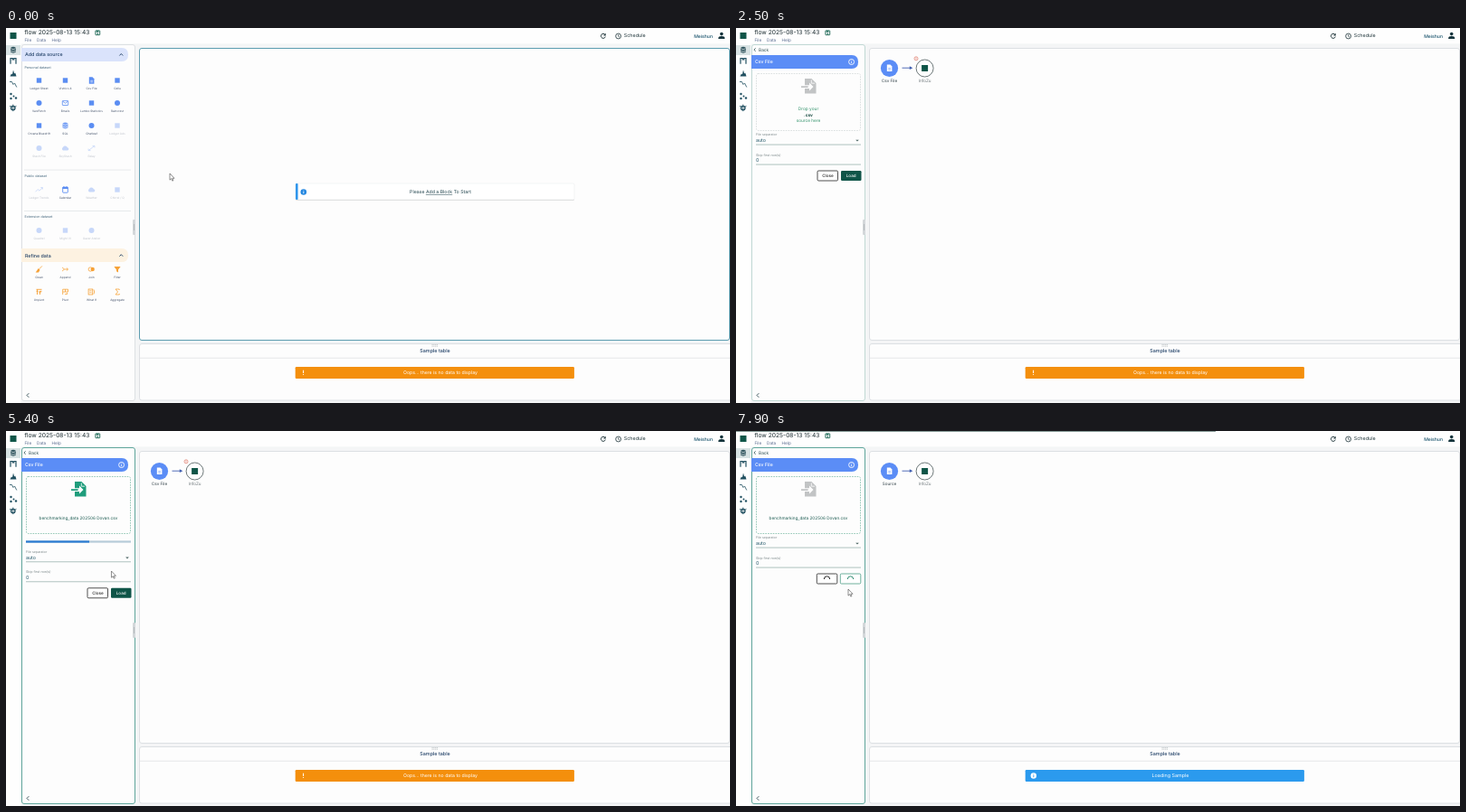
Write an HTML page that moves like this. It is 800 px wide and 415 px high and loops after 8 s.

```html
<!DOCTYPE html>
<html lang="en">
<head>
<meta charset="utf-8">
<title>Flow editor</title>
<style>
  html, body { margin: 0; width: 100%; height: 100%; overflow: hidden; background: #fff; }
  svg { display: block; width: 800px; height: 415px; }
  text { font-family: Inter, "Open Sans", sans-serif; text-rendering: geometricPrecision; }
  .drag text { font-family: "Open Sans", "Noto Sans", sans-serif; }
  .link { text-decoration: underline; text-decoration-thickness: .5px; text-underline-offset: .7px; }
</style>
</head>
<body>
<svg id="stage" viewBox="0 0 800 415" xmlns="http://www.w3.org/2000/svg"></svg>
<script>
const LOOP = 8000, STEP = 100;
const CLICK = 1400, LEAVE = 2300, DRAG = 2900, DROP = 4200, LOAD = 6700;
const TEAL = '#0f5548', NAVY = '#1f3f66', BLUE = '#5b8df2', ORANGE = '#f6a238';

// Drawing helpers
const text = (x, y, s, size, fill, more = '') =>
  `<text x="${x}" y="${y}" font-size="${size}" fill="${fill}" ${more}>${s}</text>`;
const mid = (x, y, s, size, fill, more = '') =>
  text(x, y, s, size, fill, 'text-anchor="middle" ' + more);
const rect = (x, y, w, h, fill, more = '') =>
  `<rect x="${x}" y="${y}" width="${w}" height="${h}" fill="${fill}" ${more}/>`;
const disc = (x, y, r, fill, more = '') =>
  `<circle cx="${x}" cy="${y}" r="${r}" fill="${fill}" ${more}/>`;
const line = (d, color, w = .8, more = '') =>
  `<path d="${d}" fill="none" stroke="${color}" stroke-width="${w}" ${more}/>`;
const shape = (d, fill, more = '') => `<path d="${d}" fill="${fill}" ${more}/>`;
const at = (x, y, body, more = '') => `<g transform="translate(${x} ${y})" ${more}>${body}</g>`;
const group = (id, body, more = '') => `<g id="${id}" ${more}>${body}</g>`;
const MEDIUM = 'font-weight="500"';

// Small icons, centred on 0,0 and taking one colour
const icons = {
  box: c => rect(-2.7, -2.7, 5.4, 5.4, c),
  dot: c => disc(0, 0, 3, c),
  doc: c => shape('M-2.7 -3.7H1L2.9 -1.8V3.7H-2.7Z', c) + line('M-1.3 .3H1.5M-1.3 1.9H1.5', '#fff', .6),
  mail: c => rect(-3.2, -2.4, 6.4, 4.9, 'none', `stroke="${c}" stroke-width=".8" rx=".5"`) + line('M-3 -2L0 .3L3 -2', c),
  base: c => shape('M-3 -2.3Q0 -4.6 3 -2.3V2.3Q0 4.5 -3 2.3Z', c, 'opacity=".85"') + line('M-3 -1.5Q0 .2 3 -1.5M-3 1Q0 2.7 3 1', '#fff', .6),
  cloud: c => shape('M-2.5 2.5A2 2 0 0 1 -2.5 -1A2.7 2.7 0 0 1 2.4 -.8A1.7 1.7 0 0 1 2.6 2.5Z', c),
  trend: c => line('M-4 2.3L-1.4 -.5L.5 1.2L3.8 -2.3M1.8 -2.5H3.9V-.5', c),
  arrows: c => line('M-3.3 2.5L3.3 -2.5M1 -2.6H3.4V-.6M-3.4 .6V2.6H-1', c),
  calendar: c => rect(-2.8, -2.8, 5.6, 6, 'none', `stroke="${c}" stroke-width=".9" rx=".5"`) + rect(-3, -3, 6, 2, c) + line('M-1.6 -4V-2.5M1.6 -4V-2.5', c),
  broom: c => line('M3.4 -3.6L.2 -.2', c) + shape('M-.7 -1L1 .8L-.5 3.4H-3.8Z', c),
  append: c => line('M-3.4 -2L-1 0H3M-3.4 2L-1 0M1.4 -1.5L3 0L1.4 1.5', c),
  join: c => disc(-1.2, 0, 2.2, 'none', `stroke="${c}" stroke-width=".8"`) + disc(1.2, 0, 2.2, c),
  filter: c => shape('M-3.6 -3H3.6L1 .4V3.4L-1 2.2V.4Z', c),
  unpivot: c => line('M-3 -2.7H3M-3 -.7H-.8M-2 -2.7V3M1 3V-.7H3M-.2 .6L1 -.8L2.2 .6', c, .9),
  pivot: c => line('M-2.8 3V-2.8H3V0H-2.8M0 -2.8V0M-.4 2.6H2V.8', c),
  whatIf: c => rect(-3.4, -3, 4.6, 6, 'none', `stroke="${c}" stroke-width=".8"`) + line('M-2.2 -1.2H0M-2.2 .8H0M2.4 -2.6Q4 0 2.4 2.6', c),
  sigma: c => line('M2.2 -2V-3H-2L.6 0L-2 3H2.3V2', c)
};

const COLS = [36.5, 65.5, 94.5, 123];
// [icon, label, disabled]
const row = (y, color, items) => items.map(([icon, label, off], i) =>
  at(COLS[i], y, icons[icon](color) + mid(0, 10.1, label, 3.2, '#46546c'), off ? 'opacity=".33"' : '')).join('');
const chevronUp = y => line(`M125.4 ${y + 1}L127.3 ${y - 1}L129.2 ${y + 1}`, NAVY, .9);
const pill = (y, fill) => shape(`M17 ${y}H128Q135 ${y} 135 ${y + 7.5}T128 ${y + 15}H17Z`, fill);
const heading = (y, s) => text(20.5, y, s, 3.7, '#47697f');
const rule = y => rect(20, y, 118, .7, '#dfe2e4');

const listView = pill(22, '#dae3fb') + text(21, 31.4, 'Add data source', 5.3, NAVY, MEDIUM) + chevronUp(29.5)
  + heading(44.8, 'Personal dataset')
  + row(58, BLUE, [['box', 'Ledger Sheet'], ['box', 'Vistrics 4'], ['doc', 'Csv File'], ['box', 'Cellu']])
  + rect(88, 52, 12.5, 12.5, '#dde7f6', 'id="iconHover" opacity=".7"')
  + row(83, BLUE, [['dot', 'VastFetch'], ['mail', 'Emails'], ['box', 'Lumbo Statistics'], ['dot', 'Raincrest']])
  + row(108, BLUE, [['box', 'Orvana Bluedrift'], ['base', 'SQL'], ['dot', 'Chatleaf'], ['box', 'Ledger Ads', 1]])
  + row(133, BLUE, [['dot', 'Stash File', 1], ['cloud', 'SkyStash', 1], ['arrows', 'Relay', 1]])
  + rule(156.7) + heading(165, 'Public dataset')
  + row(179, BLUE, [['trend', 'Ledger Trends', 1], ['calendar', 'Calendar'], ['cloud', 'Weather', 1], ['box', 'Chirrel / Q', 1]])
  + rule(202) + heading(210.4, 'Extension dataset')
  + row(224, BLUE, [['dot', 'Quadrel', 1], ['box', 'Might VI', 1], ['dot', 'Gazer Atelier', 1]])
  + pill(244, '#fdf2e1') + text(21, 253.5, 'Refine data', 5.3, NAVY, MEDIUM) + chevronUp(251.7)
  + row(267, ORANGE, [['broom', 'Clean'], ['append', 'Append'], ['join', 'Join'], ['filter', 'Filter']])
  + row(292, ORANGE, [['unpivot', 'Unpivot'], ['pivot', 'Pivot'], ['whatIf', 'What If'], ['sigma', 'Aggregate']]);

const info = (x, y, r, fill, ink) => disc(x, y, r, fill) + line(`M${x} ${y - .4}V${y + 1.7}M${x} ${y - 1.8}V${y - 1}`, ink, .9);
const button = (id, x, fill, stroke) => rect(x, 158, 22.5, 11, fill, `id="${id}" rx="1.2" stroke="${stroke}" stroke-width=".8"`);
const spinner = (x, color) => at(x, 164, line('M-3.2 0A3.2 3.2 0 0 1 3.2 0', color, 1, 'class="spin"'));

const fields = text(22, 119.3, 'File separator', 3.6, '#7e8a8c')
  + text(22, 126.4, 'auto', 5.3, '#24586a') + shape('M132.2 123.7H135.8L134 125.6Z', '#4c6664')
  + rect(22, 128.7, 116, .7, '#8ba8a4')
  + text(22, 141.5, 'Skip first row(s)', 3.7, '#7e8a8c') + text(22, 148.4, '0', 5.3, '#24586a')
  + rect(22, 150.7, 116, .7, '#8ba8a4')
  + group('buttons', button('close', 90, '#fff', '#222') + mid(101.4, 165.2, 'Close', 4.6, '#222', MEDIUM)
    + button('load', 116, TEAL, 'none') + mid(127.2, 165.2, 'Load', 4.6, '#fff', MEDIUM))
  + group('waiting', button('w1', 89.3, '#fff', '#222') + button('w2', 115.3, '#fff', '#4a9c85')
    + spinner(100.5, '#222') + spinner(126.5, '#2d8a70'));

const csvView = line('M21.6 22.3L20 24.1L21.6 25.9', '#2f5053', .8) + text(25, 26, 'Back', 4.8, '#2f5053')
  + pill(30, '#5b8df6') + text(21, 39.4, 'Csv File', 5.2, '#fff', MEDIUM)
  + disc(127.6, 37.5, 3, 'none', 'stroke="#fff" stroke-width=".9"') + line('M127.6 37.1V39.2M127.6 35.7V36.4', '#fff')
  + rect(22.5, 50.5, 115, 63, 'none', 'id="zone" rx="2" stroke-width=".6" stroke-dasharray="1.6 1.2"')
  + group('zoneIcon', shape('M76 56H83.5L88.5 61V72.5H76V67H81V69.5L85.5 65L81 60.5V63.2H76Z M72 64.2H79.6V66H72Z', 'currentColor')
    + shape('M83.3 57.5V61.2H87', 'none', 'stroke="#fff" stroke-width=".8"'))
  + group('prompt', mid(80, 91, 'Drop your', 4.8, '#2e9068') + mid(80, 97.6, '.csv', 4.7, '#14483e', 'font-weight="700"')
    + mid(80, 104.2, 'source here', 4.7, '#2e9068'))
  + mid(80, 97.7, 'benchmarking_data 202506 Dovan.csv', 4.7, '#1d5c52', 'id="fileName"')
  + group('upload', rect(22, 121.4, 116, 2.2, '#b6cbd9') + rect(22, 121.4, 70, 2.2, '#2c7cd3'))
  + group('fields', fields);

const rail = rect(0, 19, 16, 11, '#d8e2e3')
  + at(8, 24.3, icons.base('#173f4a'))
  + line('M5 39.8V33.5H7.3V35H8.8V33.5H11V39.8', '#1f4e5f', 1.2)
  + shape('M4.5 53.5L6 50.5L7 51.5L8 46.5L9.2 50.5L10.2 49.5L11.5 53.5Z', '#1f4e5f')
  + line('M4 59.5H6.5L8 62.5L9.5 61L11.8 65.5', '#1f4e5f', .8)
  + disc(5.5, 73, 1.2, '#1f4e5f') + disc(5.5, 78, 1.2, '#1f4e5f') + disc(8.5, 75.5, 1, '#1f4e5f') + disc(11, 77.5, 1.2, '#1f4e5f')
  + disc(7.8, 88.5, 2.2, 'none', 'stroke="#1f4e5f" stroke-width="1.3"') + line('M7.8 84.5V92.2M4 86.3L6 87.3M11.5 86.3L9.6 87.3', '#1f4e5f');

const header = rect(4.5, 5, 7, 7, TEAL)
  + text(20.4, 7, 'flow 2025-08-13 15:43', 6.7, '#1b2b30')
  + text(20.4, 15.2, 'File', 4.7, '#5a6c90') + text(34, 15.2, 'Data', 4.7, '#5a6c90') + text(50.6, 15.2, 'Help', 4.7, '#5a6c90')
  + rect(98.9, 2.9, 4.8, 4.8, 'none', 'stroke="#12614f" stroke-width=".9" rx=".4"') + rect(99.8, 3.2, 2.6, 1.4, '#12614f') + disc(101.3, 6.2, .8, '#12614f')
  + line('M661.8 7.2A2.5 2.5 0 1 0 662.3 9.6', '#1d3338', 1) + shape('M662.7 5.7V8.5H660Z', '#1d3338')
  + disc(676.6, 9, 2.9, 'none', 'stroke="#1d3338" stroke-width=".8"') + line('M676.6 7.2V9.2L677.9 10', '#1d3338', .7)
  + text(682.8, 10.4, 'Schedule', 5.4, '#1d3338')
  + text(781, 10.8, 'Meishun', 5.1, '#15506a', 'text-anchor="end" ' + MEDIUM)
  + disc(790.7, 6.6, 1.8, '#14343c') + shape('M787.2 12V11Q787.2 9 790.7 9T794.2 11V12Z', '#14343c');

const frame = (id, x, y, w, h) => rect(x, y, w, h, '#fdfdfd', `id="${id}" rx="2.5"`);
const banner = (id, fill, body) => group(id, rect(319.7, 375.1, 308.2, 12.9, fill, 'rx="1.2"') + body);

const startCard = rect(320, 173, 308, 18, '#000', 'opacity=".13" rx="1.5"')
  + rect(320, 172, 308, 18, '#fff', 'rx="1.5" stroke="#e6e8ea" stroke-width=".5"')
  + rect(320, 172, 2.6, 18, '#2f96ec', 'rx="1"') + info(328.8, 181.5, 3.3, '#2487e0', '#fff')
  + mid(480, 183.2, 'Please <tspan class="link">Add a Block</tspan> To Start', 5.2, '#24464f');

const nodes = disc(169.5, 44.5, 9.6, '#5b8df6') + at(169.5, 44.3, icons.doc('#fff') + line('M-1.3 .3H1.5M-1.3 1.9H1.5', '#5b8df6', .6))
  + mid(169.5, 60, 'Csv File', 4.6, '#2c3c43', 'id="nodeLabel"')
  + line('M183.5 44.2H193', '#3f5db0', .9) + shape('M191.8 42.3L195.3 44.2L191.8 46.1Z', '#3f5db0')
  + disc(208.6, 44.5, 9.5, '#fff', 'stroke="#4a5759" stroke-width=".8"') + rect(205.1, 41, 7, 7, TEAL)
  + mid(208.6, 60, 'InfoZu', 4.6, '#6a7478')
  + group('badge', disc(199, 33.8, 2, '#fff', 'stroke="#d9604c" stroke-width=".6"') + line('M199 32.7V34M199 34.5V35', '#d9604c', .6));

const halo = 'stroke="#fff" stroke-width="1" paint-order="stroke"';
const dragged = group('dragged',
  shape('M-16 -28H-1L5 -22V-1H-16Z', '#f7f9f7', 'stroke="#b9c2bb" stroke-width=".7"') + line('M-1 -28V-22H5', '#b9c2bb', .7)
  + text(-5, -11.5, 'a,', 8, '#a9cdb5') + rect(-20, -22, 14, 14, '#4ba36f')
  + mid(-9, 11, 'benchmarking_...', 7.1, '#a3a3a3', halo) + mid(-7.5, 21, '202506 Do...', 7.1, '#a3a3a3', halo)
  + rect(6, 8, 40, 13, '#fbfbfc', 'stroke="#dcdfe4" stroke-width=".6"') + line('M10 14.2H16.5M13.2 11V17.4', '#555', .7)
  + text(19, 17, 'Copier', 7.2, '#2450a8'), 'class="drag"');

const arrow = shape('M0 0V7.2L1.7 5.7L2.8 8.2L3.9 7.7L2.8 5.3H5Z', '#fff', 'id="arrow" stroke="#444" stroke-width=".6" stroke-linejoin="round"');
const hand = group('hand', shape('M-.8 .8Q0 -.6 .8 .8V3.4L3 3.8Q4.4 4.1 4.3 5.4L3.6 9.6H-1.2L-3.3 6.2Q-3.6 5.2 -2.4 5.2L-.8 6.4Z', '#fff', 'stroke="#222" stroke-width=".8" stroke-linejoin="round"')
  + line('M.8 3.4V5.3M2 3.7V5.3M3.1 4V5.3', '#222', .5));

document.getElementById('stage').innerHTML =
  rect(0, 0, 800, 415, '#fefefe') + rect(16.5, 17.5, 784, 398, '#f4f5f6') + header + rail
  + frame('side', 17.5, 18.5, 125, 394) + frame('main', 147.5, 22.5, 652, 323)
  + rect(147.5, 349.5, 655, 62.5, '#fdfdfd', 'rx="2.5" stroke="#d6dadd" stroke-width=".8"')
  + line('M470.5 350.6H477M470.5 352.2H477', '#aab0b4', .7, 'stroke-dasharray="1.2 .6"')
  + mid(474, 359.3, 'Sample table', 5.4, NAVY, MEDIUM) + rect(148, 364.8, 652, .7, '#d9dde0')
  + banner('noData', '#f48f0c', line('M328.6 378.7V382M328.6 383V384', '#fff', 1) + mid(480, 383.3, 'Oops... there is no data to display', 5.2, '#fff'))
  + banner('sampling', '#2b9aee', info(328.8, 381.5, 3.2, '#fff', '#2b9aee') + mid(480, 383.3, 'Loading Sample', 5.4, '#fff'))
  + group('startCard', startCard) + group('nodes', nodes)
  + group('listView', listView) + group('csvView', csvView)
  + rect(140, 212, 3, 17, '#d3d7da', 'rx="1"') + line('M141.5 217V224', '#9aa1a5', .5)
  + line('M25.3 404.2L23 406.5L25.3 408.8', '#29464c', .9)
  + rect(0, 0, 0, .6, '#3a5b55', 'id="topBar"')
  + group('tooltip', rect(46, 76, 97, 10, '#616161', 'rx="1.2"') + mid(94.3, 82.5, 'Click to add Csv File source to your flow.', 4.5, '#fff'))
  + group('pointer', dragged + arrow + hand);

const $ = id => document.getElementById(id);
const show = (id, on) => $(id).style.display = on ? '' : 'none';
const set = (id, name, value) => $(id).setAttribute(name, value);
const spins = document.querySelectorAll('.spin');

// [time, x, y]
const PATH = [
  [100, 181, 161], [900, 96.5, 60], [1800, 96.5, 60], [LEAVE, 70, 422],
  [DRAG, 812, 210], [3700, 304, 108], [DROP, 93.5, 85], [4800, 93.5, 85],
  [5700, 124.5, 179.5], [6900, 124.5, 179.5], [7300, 124, 175]
];
// [time, width] of the loading line along the top edge
const BAR = [[DROP, 0], [4500, 258], [5100, 800], [5101, 0], [LOAD, 0], [7900, 530]];

function sample(keys, t, ease = k => k) {
  const i = keys.findIndex(k => k[0] > t);
  if (i < 0) return keys[keys.length - 1].slice(1);
  if (i === 0) return keys[0].slice(1);
  const a = keys[i - 1], b = keys[i], k = ease((t - a[0]) / (b[0] - a[0]));
  return a.slice(1).map((v, j) => v + (b[j + 1] - v) * k);
}
const smooth = k => k * k * (3 - 2 * k);
const inside = (x, y, x0, y0, x1, y1) => x >= x0 && x <= x1 && y >= y0 && y <= y1;

function render(t) {
  const dragging = t >= DRAG && t < DROP;
  const away = t >= LEAVE && t < DRAG;
  const list = t < CLICK, loading = t >= LOAD, uploaded = t >= DROP && !loading;
  const [x, y] = sample(PATH, t, dragging ? undefined : smooth);
  const free = !away && !dragging;

  const onIcon = list && inside(x, y, 88, 52, 101, 68);
  const onLoad = uploaded && inside(x, y, 116, 174, 138, 185);
  const onZone = !list && !loading && inside(x, y, 22, 50, 138, 114);
  const hover = onIcon || onLoad || onZone;
  const onSide = free && inside(x, y, 17, 18, 143, 413);
  const onMain = free && inside(x, y, 147, 22, 800, 346);

  set('side', 'stroke', onSide ? '#5fa59b' : list ? '#d6dadd' : '#b3d0cb');
  set('side', 'stroke-width', onSide ? 1 : .8);
  set('main', 'stroke', onMain ? '#5c9db0' : '#d6dadd');
  set('main', 'stroke-width', onMain ? 1 : .8);

  show('listView', list);
  show('startCard', list);
  show('iconHover', onIcon);
  show('tooltip', onIcon);
  show('csvView', !list);
  show('nodes', !list);
  show('badge', !loading);
  $('nodeLabel').textContent = loading ? 'Source' : 'Csv File';

  show('prompt', t < DROP);
  show('fileName', t >= DROP);
  show('upload', uploaded);
  set('zone', 'stroke', t < DROP ? '#c3cbcb' : '#4fa489');
  $('zoneIcon').style.color = uploaded ? '#1f9d7c' : '#c2c4c5';
  set('fields', 'transform', `translate(0 ${uploaded ? 15.8 : 0})`);
  show('buttons', !loading);
  show('waiting', loading);
  set('load', 'fill', onLoad ? '#17211f' : TEAL);
  for (const s of spins) s.setAttribute('transform', `rotate(${(t - 7900) / 1400 * 360})`);
  show('noData', !loading);
  show('sampling', loading);
  set('topBar', 'width', sample(BAR, t)[0]);

  show('pointer', !away);
  set('pointer', 'transform', `translate(${x} ${y})`);
  show('dragged', dragging);
  show('hand', free && hover);
  show('arrow', !(free && hover));
}

const begin = performance.now();
function tick(now) {
  const t = Math.max(0, now - begin) % LOOP;
  render(Math.floor(t / STEP) * STEP);
  requestAnimationFrame(tick);
}
render(0);
requestAnimationFrame(tick);
</script>
</body>
</html>
```
